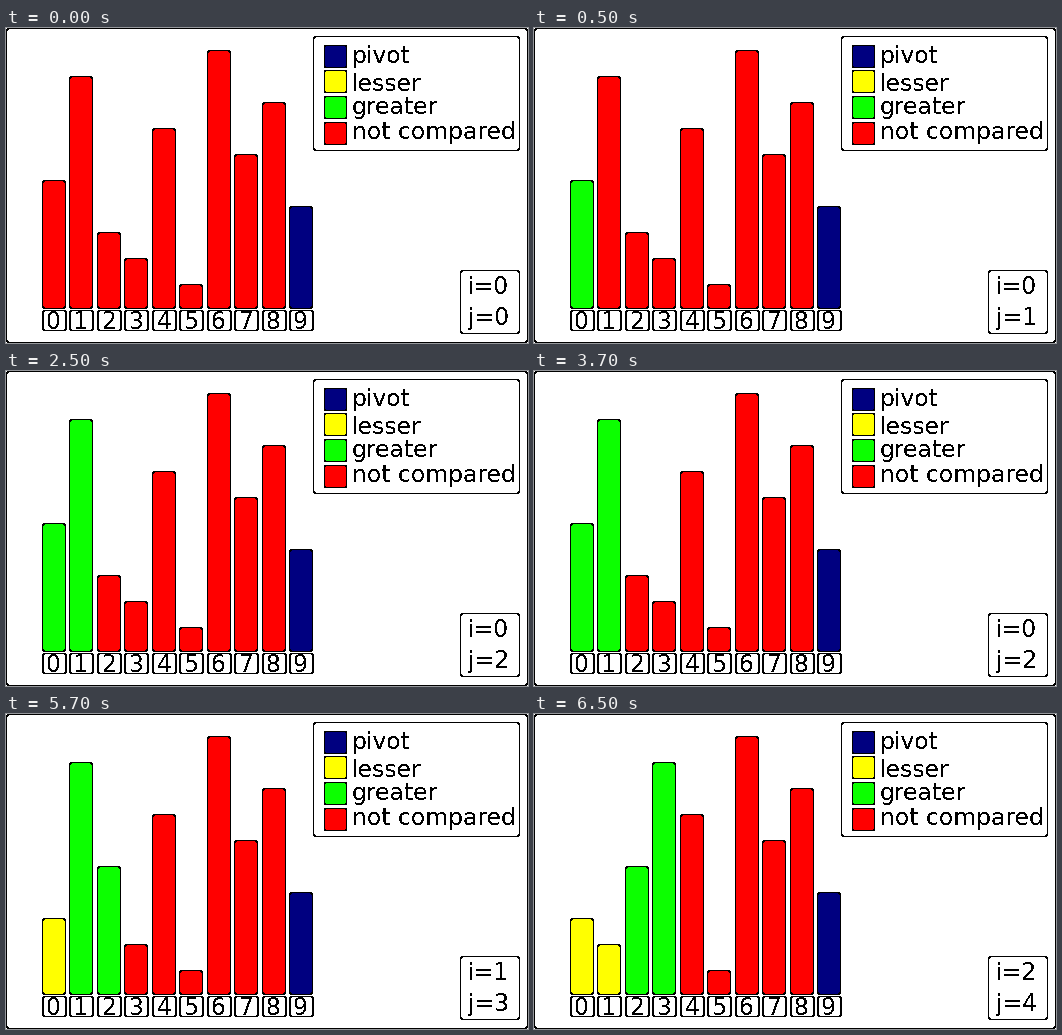
Animation, 522 px wide and 315 px high, one loop 8 s. Source, as a matplotlib script:

```python
import matplotlib.pyplot as plt
from matplotlib.animation import FuncAnimation
from matplotlib.patches import FancyBboxPatch

W, H, DPI = 522, 315, 72
INTERVAL, FRAMES = 500, 16
PIVOT, LESSER, GREATER, WAITING = "#000080", "#ffff00", "#0cff00", "#ff0000"
VALUES = [5, 9, 3, 2, 7, 1, 10, 6, 8, 4]
LEFT, PITCH, BAR_W = 36.5, 27.45, 23
BASE, ORIGIN, UNIT = 280.5, 282.5, 26

plt.rcParams.update({"font.family": "DejaVu Sans", "text.antialiased": False,
                     "text.hinting": "no_autohint"})
fig = plt.figure(figsize=(W / DPI, H / DPI), dpi=DPI, facecolor="white")
ax = fig.add_axes([0, 0, 1, 1])
ax.set(xlim=(0, W), ylim=(H, 0))
ax.axis("off")


def box(x0, y0, x1, y1, color="white", radius=3):
    patch = FancyBboxPatch((x0, y0), x1 - x0, y1 - y0,
                           boxstyle=f"round,pad=0,rounding_size={radius}",
                           facecolor=color, edgecolor="black", linewidth=0.8,
                           antialiased=False, snap=False)
    return ax.add_patch(patch)


def label(x, y, text, size=23.5, align="left"):
    return ax.text(x, y, text, fontsize=size, ha=align, va="baseline")


def partition(step):
    """Array, i and j after the given number of comparisons."""
    data, i = VALUES[:], 0
    for j in range(step):
        if data[j] < data[-1]:
            data[i], data[j] = data[j], data[i]
            i += 1
    return data, i, step


def bar_color(k, i, j):
    if k == len(VALUES) - 1:
        return PIVOT
    return LESSER if k < i else GREATER if k < j else WAITING


box(0.5, 0.5, W - 0.5, H - 0.5)
box(307.5, 8.5, 513.5, 122.5)
for top, baseline, color, name in [(17.5, 35, PIVOT, "pivot"),
                                   (42.5, 63, LESSER, "lesser"),
                                   (68.5, 86, GREATER, "greater"),
                                   (94.5, 111, WAITING, "not compared")]:
    box(318.5, top, 340.5, top + 22, color, 2)
    label(346, baseline, name)

box(454.5, 242.5, 513.5, 305.5)
i_text = label(462, 266, "")
j_text = label(462, 297, "")

bars = []
for k in range(len(VALUES)):
    x = round(LEFT + PITCH * k - 0.5) + 0.5
    bars.append(box(x, BASE - UNIT, x + BAR_W, BASE))
    box(x + 0.5, 282.5, x + BAR_W + 0.5, 302.5, radius=2)
    label(x + BAR_W / 2 + 0.3, 301, str(k), 23.5, "center")


def update(frame):
    data, i, j = partition((frame + 3) // 4)
    for k, (bar, value) in enumerate(zip(bars, data)):
        top = ORIGIN - UNIT * value
        bar.set_y(top)
        bar.set_height(BASE - top)
        bar.set_facecolor(bar_color(k, i, j))
    i_text.set_text(f"i={i}")
    j_text.set_text(f"j={j}")
    return [*bars, i_text, j_text]


anim = FuncAnimation(fig, update, frames=FRAMES, interval=INTERVAL,
                     repeat=True, repeat_delay=0)
plt.show()
```
